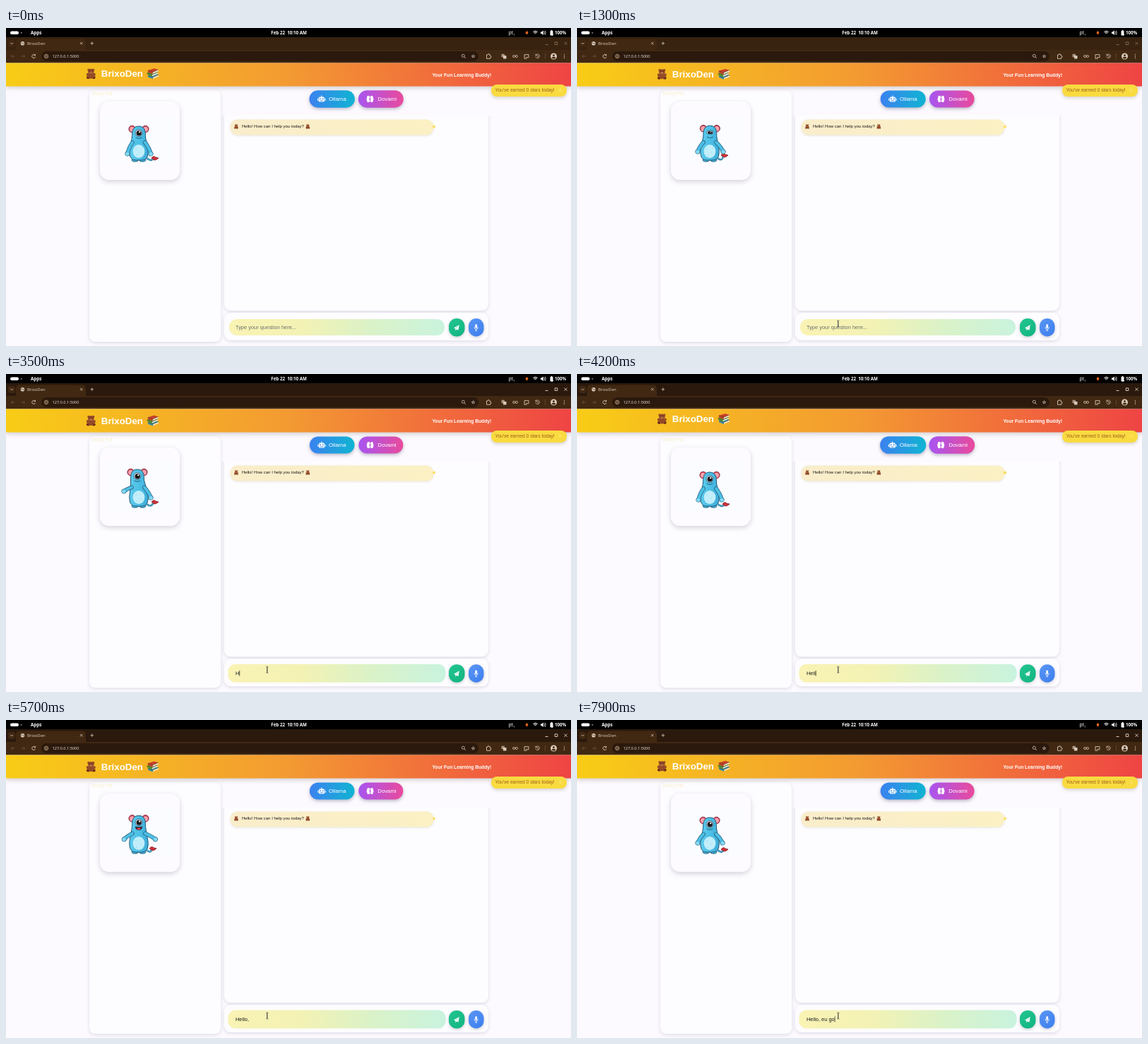
These frames come from a looping animation (800 by 450 pixels, 8000 ms). An HTML page with a canvas:

```html
<!DOCTYPE html>
<html lang="en">
<head>
<meta charset="utf-8">
<title>BrixoDen</title>
<style>
html, body { margin: 0; width: 100%; height: 100%; overflow: hidden; background: #fcfaff; }
canvas { display: block; width: 800px; height: 450px; }
</style>
</head>
<body>
<canvas id="stage" width="800" height="450"></canvas>
<script>
const LOOP = 8000;
const SANS = '"Liberation Sans", Arial, sans-serif';
const UI = '"Noto Sans", "Open Sans", sans-serif';
const canvas = document.getElementById('stage');
const c = canvas.getContext('2d');
const ratio = window.devicePixelRatio || 1;
canvas.width = 800 * ratio;
canvas.height = 450 * ratio;

// ---------- helpers ----------
function text(s, x, y, font, color) {
  c.font = font;
  c.fillStyle = color;
  c.fillText(s, x, y);
}
function box(x, y, w, h, r, fill) {
  c.beginPath();
  c.roundRect(x, y, w, h, r);
  c.fillStyle = fill;
  c.fill();
}
function oval(x, y, rx, ry, fill, line, width = 1) {
  c.beginPath();
  c.ellipse(x, y, rx, ry, 0, 0, Math.PI * 2);
  if (fill) { c.fillStyle = fill; c.fill(); }
  if (line) { c.strokeStyle = line; c.lineWidth = width; c.stroke(); }
}
function draw(d, fill, line, width = 1) {
  const p = new Path2D(d);
  if (fill) { c.fillStyle = fill; c.fill(p); }
  if (line) { c.strokeStyle = line; c.lineWidth = width; c.stroke(p); }
}
function blend(x0, y0, x1, y1, ...colors) {
  const g = c.createLinearGradient(x0, y0, x1, y1);
  colors.forEach((k, i) => g.addColorStop(i / (colors.length - 1), k));
  return g;
}
function shadow(color, blur, dy, fn) {
  c.save();
  c.shadowColor = color;
  c.shadowBlur = blur * ratio;
  c.shadowOffsetY = dy * ratio;
  fn();
  c.restore();
}
function at(x, y, scale, fn) {
  c.save();
  c.translate(x, y);
  c.scale(scale, scale);
  fn();
  c.restore();
}
function star(x, y, r, turn, fill) {
  c.beginPath();
  for (let i = 0; i < 10; i++) {
    const a = turn - Math.PI / 2 + i * Math.PI / 5;
    const k = i % 2 ? r * 0.45 : r;
    c.lineTo(x + k * Math.cos(a), y + k * Math.sin(a));
  }
  c.closePath();
  c.fillStyle = fill;
  c.fill();
}

// ---------- desktop and browser ----------
function topBar() {
  c.fillStyle = '#000';
  c.fillRect(0, 0, 800, 13);
  box(6, 4.5, 12, 4.5, 2.2, '#fff');
  oval(21.8, 6.8, 1.1, 1.1, '#777');
  text('Apps', 35, 9, '600 6.3px ' + UI, '#fff');
  text('Feb 22  10:10 AM', 375.3, 9, '600 6.2px ' + UI, '#fff');
  text('pt', 711.5, 9, '6.6px ' + UI, '#fff');
  text('1', 718, 10.5, '4px ' + UI, '#fff');
  oval(737.5, 6.8, 1.8, 2.3, '#d8601a');
  for (const r of [1.4, 3, 4.6]) {
    c.beginPath();
    c.arc(749.5, 9, r, -2.3, -0.85);
    c.strokeStyle = '#fff';
    c.lineWidth = 1;
    c.stroke();
  }
  draw('M757 5.5h1.6l2.2-2v6.6l-2.2-2h-1.6z', '#fff');
  draw('M762 4.8q1.6 2 0 4M763.2 3.6q2.2 3.2 0 6.4', null, '#fff', 0.7);
  box(770.5, 4, 4, 6.5, 0.8, '#fff');
  box(771.6, 3, 1.8, 1.5, 0.3, '#fff');
  draw('M773.5 7v4m-1.4-1.5h3', null, '#fff', 0.8);
  text('100%', 777, 9, '600 6.2px ' + UI, '#fff');
}

function browser(active) {
  const ink = '#d8c9ba', bar = '#412812', dim = '#75583f';
  c.fillStyle = active ? '#2a190c' : '#382210';
  c.fillRect(0, 13, 800, 18);
  box(14, 15.5, 99, 20, 5, bar);
  c.fillStyle = bar;
  c.fillRect(0, 31, 800, 18.5);
  box(3, 17, 10, 10, 3, bar);
  draw('M6.3 21l1.8 1.8 1.8-1.8', null, ink, 0.9);
  oval(23.5, 21.8, 2.8, 2.8, ink);
  draw('M21.3 21.6q1.3-1.5 2.2 0t2.4 0', null, bar, 0.8);
  text('BrixoDen', 30, 24, '5.9px ' + UI, ink);
  draw('M105 20l3.4 3.4m0-3.4l-3.4 3.4M119.5 21.7h4.6m-2.3-2.3v4.6', null, ink, 0.8);
  draw('M763.5 23.5h4M790.5 19.7l4 4m0-4l-4 4M777.2 19.9h3.6v3.6h-3.6z', null, active ? '#e5d9cf' : '#8a6c50', 0.9);

  draw('M12.5 40h-5m2-2.2l-2.2 2.2 2.2 2.2M21.5 40h5m-2-2.2l2.2 2.2-2.2 2.2', null, dim, 0.8);
  draw('M41.2 38.4a2.5 2.5 0 1 0 .4 2.5m-.1-4v2h-2', null, ink, 0.9);
  box(50, 33, 619, 14, 7, '#2a190c');
  oval(57, 40, 4, 4, bar);
  oval(57, 40, 2.4, 2.4, null, ink, 0.7);
  draw('M57 39.6v1.6m0-2.8v.6', null, ink, 0.7);
  text('127.0.0.1:5000', 65.5, 42, '5.6px ' + UI, '#e8ddd2');
  oval(647.3, 39.3, 2, 2, null, ink, 0.8);
  draw('M648.8 40.8l2 2', null, ink, 0.9);
  star(661.5, 40, 3, 0, ink);
  star(661.5, 40, 1.5, 0, '#2a190c');
  draw('M680.5 38h1.8q0-1.5 1-1.5t1 1.5h1.4v1.7q1.4 0 1.4 1t-1.4 1v1.6h-5.2z', null, ink, 0.9);
  box(701.5, 36.8, 4.5, 4.5, 0.6, '#a89480');
  box(704, 39, 4.5, 4.5, 0.6, ink);
  oval(719.2, 40, 1.7, 1.5, null, ink, 0.8);
  oval(722.8, 40, 1.7, 1.5, null, ink, 0.8);
  draw('M734 42.7v-5h6v4h-4m-2.5 1.5h4', null, ink, 0.9);
  draw('M750.2 38.2a2.8 2.8 0 1 1-.4 2.4m.1-3.8v2h2m.9-.2v1.8l1.2.8', null, ink, 0.8);
  draw('M763.5 36v8', null, dim, 0.6);
  oval(775.5, 40, 4.5, 4.5, ink);
  oval(775.5, 38.7, 1.4, 1.4, bar);
  oval(775.5, 42.2, 2.6, 1.4, bar);
  for (const y of [37.6, 40, 42.4]) oval(790.5, y, 0.7, 0.7, ink);
}

// ---------- page ----------
function bear(x, y, s) {
  at(x, y, s, () => {
    const fur = '#954a28', dark = '#6c3018';
    for (const k of [-1, 1]) {
      oval(k * 3.7, -5.8, 1.7, 1.7, fur);
      oval(k * 5, 1.5, 2, 2.3, fur);
      oval(k * 4.3, 6, 2.6, 2.2, dark);
    }
    oval(0, 3, 4.6, 4.8, fur);
    oval(0, -3.3, 4.6, 4, fur);
    oval(0, -1.8, 2, 1.5, '#c98758');
    for (const k of [-1, 1]) oval(k * 1.8, -4, 0.6, 0.6, '#200');
    oval(0, -2.4, 0.8, 0.5, '#200');
  });
}
function books(x, y) {
  at(x, y, 1, () => {
    const colors = ['#2b8aa8', '#5a9632', '#c8402c'];
    colors.forEach((k, i) => {
      const b = 2.2 - i * 3.5, dx = [0.6, -0.8, 0.2][i];
      draw(`M${dx - 7} ${b}l9-2.6 6 1.8-8 3.4z`, k);
      draw(`M${dx - 7} ${b}l7 2.6v2.6l-7-2.6z`, k);
      draw(`M${dx} ${b + 2.6}l8-3.4v2.2l-8 3.4z`, '#f5ecd5');
      draw(`M${dx - 7} ${b}l7 2.6 8-3.4`, null, '#43200c', 0.5);
    });
  });
}
function header(lift) {
  shadow('rgba(90,70,60,.25)', 6, 2, () => {
    c.fillStyle = blend(0, 49, 800, 82, '#f8cd16', '#f39a32', '#ef4444');
    c.fillRect(0, 49.5, 800, 33);
  });
  bear(120.3, 64.8 + lift, 0.93);
  text('BrixoDen', 134.8, 69.6 + lift, 'bold 13.3px ' + SANS, '#fff');
  books(207.6, 65 + lift);
  text('Your Fun Learning Buddy!', 603.4, 68.6, 'bold 6.7px ' + SANS, '#fff');
}
function badge() {
  shadow('rgba(90,80,60,.25)', 5, 2, () =>
    box(687, 80, 107, 17, 8, '#f9da40'));
  text("You've earned 0 stars today!", 692.4, 90.4, '6.7px ' + SANS, '#a0601c');
  star(785, 88, 3.4, 0, '#fce25c');
}
function panels() {
  const soft = 'rgba(70,60,100,.17)', paper = '#fdfcff';
  shadow(soft, 5, 1.5, () => box(118, 88, 186, 356, 8, paper));
  text('Study Pal', 121, 95, 'bold 6.5px ' + SANS, '#fbf3d8');
  shadow('rgba(70,60,90,.22)', 7, 2.5, () => box(133, 104, 113, 111, 13, '#fdfbff'));
  box(142, 123, 96, 71, 2, '#fbfcff');
  // the message list has a scrolled-off top edge
  c.save();
  c.beginPath();
  c.rect(304, 124, 390, 290);
  c.clip();
  shadow(soft, 5, 1.5, () => box(309, 110, 374, 290, 9, paper));
  c.restore();
  shadow(soft, 5, 1.5, () => box(309, 403, 374, 39, 9, paper));
}
function modelButton(x, y, w, scale, colors, label, icon) {
  at(x, y, scale, () => {
    shadow('rgba(60,50,90,.35)', 5, 2, () =>
      box(-w / 2, -12, w, 24, 12, blend(-w / 2, 0, w / 2, 0, ...colors)));
    icon();
    text(label, -w / 2 + 27, 2.7, '7.75px ' + SANS, '#fff');
  });
}
function robot() {
  box(-18.7, -3, 8, 7, 1.5, '#fff');
  box(-20.4, -1, 1.1, 3.5, 0.4, '#fff');
  box(-10.1, -1, 1.1, 3.5, 0.4, '#fff');
  c.fillRect(-15.2, -5, 1, 2.5);
  for (const x of [-16.6, -12.8]) oval(x, -0.3, 0.9, 0.9, '#3488e8');
  draw('M-17 2.4h4.6', null, '#3488e8', 0.9);
}
function brain() {
  for (const k of [-1, 1]) {
    const m = -15.2 + k * 2.3;
    oval(m, -2.2, 2, 2.4, '#fff');
    oval(m + k * 0.7, 0.4, 2, 2.1, '#fff');
    oval(m, 2.4, 2, 2.2, '#fff');
  }
}
function bubble(t) {
  shadow('rgba(90,80,60,.14)', 3, 1, () =>
    box(317.5, 129.5, 288, 22, 10, blend(317, 0, 606, 0, '#f9edcb', '#fbf1c4')));
  bear(326, 139.3, 0.4);
  text('Hello! How can I help you today?', 334, 141.4, '6.02px ' + SANS, '#1a1718');
  bear(427.3, 139.3, 0.4);
  const swing = Math.cos((t - 600) * Math.PI / 1000);
  star(606, 139.5, 3 + 0.4 * swing, swing * 0.35, '#fbd94e');
}

// time of each typed letter
const TYPED = 'Hello, eu go';
const KEYS = [3400, 3750, 3950, 4100, 4300, 4550, 4750, 6000, 6300, 6900, 7350, 7700];
function entry(t, active) {
  const grow = active ? 1.6 : 0;
  box(316 - grow, 412 - grow, 305 + 2 * grow, 23 + 2 * grow, 11,
    blend(316, 0, 621, 0, '#f9f3b4', '#f3f2b4', '#daf2c8', '#c9f3de'));
  const count = KEYS.filter(k => k <= t).length;
  const shown = TYPED.slice(0, count);
  text(shown || 'Type your question here...', 325, 426.2, '7.45px ' + SANS, count ? '#1a1a1c' : '#6c6f6c');
  const since = t - (count ? KEYS[count - 1] : 1900);
  if (active && since % 1000 < 500) {
    const x = 325.4 + (count ? c.measureText(shown).width : 0);
    draw(`M${x} 419.5v8`, null, '#222', 0.7);
  }
  shadow('rgba(60,60,80,.25)', 4, 1.5, () => {
    box(627, 411, 22.5, 25.5, 11, blend(627, 411, 649, 436, '#22c58e', '#12b482'));
    box(655, 411, 21.5, 25.5, 10.7, blend(655, 411, 676, 436, '#5a96f4', '#3c7eee'));
  });
  draw('M634 424.5l7.7-4.6-1.2 7.6-2.6-1.1-1.5 1.8-.2-2.6z', '#fff');
  draw('M636.4 425.6l4-4', null, '#1abc88', 0.5);
  box(664.3, 419.2, 2.8, 5.6, 1.4, '#fff');
  draw('M663 423.2q0 3 2.7 3t2.7-3m-2.7 3v2m-1.5 0h3', null, '#fff', 0.8);
}

// ---------- mascot ----------
// time, head x/y, left hand x/y, right hand x/y, mouth, eye, tail x/y
const CYCLE = 4000;
const POSES = [
  [0, 0, 0, 172, 178, 205, 178, 0, 1, 210, 184],
  [900, 0, 0, 172, 178, 205, 178, 0, 1, 210, 184],
  [1300, 0.3, -0.8, 171, 175, 207, 175, 0, 0.5, 208, 180],
  [1800, 0, -4, 167, 168, 212, 168, 1, 1, 207, 182],
  [2400, 3, -3.6, 170, 172, 212, 169, 1, 1, 209, 178],
  [2500, -0.3, -4, 167, 168, 212, 168, 1, 1, 206, 182],
  [3500, -2, -4, 167, 166, 205, 175, 0, 1, 210, 181],
  [3900, 0, -1, 171, 174, 206, 174, 0, 1, 208, 183],
  [CYCLE, 0, 0, 172, 178, 205, 178, 0, 1, 210, 184]
];
function poseAt(t) {
  const p = t % CYCLE;
  const i = POSES.findIndex(k => k[0] > p);
  const a = POSES[i - 1], b = POSES[i];
  const u = (p - a[0]) / (b[0] - a[0]);
  const e = u * u * (3 - 2 * u);
  return a.map((v, j) => v + (b[j] - v) * e);
}
const OUTLINE = '#235a78';
function arm(x0, y0, x1, y1, side) {
  const mx = (x0 + x1) / 2 + side * 2, my = (y0 + y1) / 2;
  const d = `M${x0} ${y0}Q${mx} ${my} ${x1} ${y1}`;
  c.lineCap = 'round';
  draw(d, null, OUTLINE, 5.6);
  oval(x1, y1, 3.3, 3.2, '#86d9f2', OUTLINE, 0.8);
  draw(d, null, '#4dbfe4', 4.2);
  oval(x1 + side * 0.3, y1 + 0.4, 2.5, 2.4, '#86d9f2');
  c.lineCap = 'butt';
}
function mascot(t) {
  const [, hx, hy, lx, ly, rx, ry, mouth, eye, tx, ty] = poseAt(t);
  const x = 188 + hx, y = 139 + hy;
  const tail = `M199 184Q206 190 ${tx - 1} ${ty}`;
  draw(tail, null, OUTLINE, 2.4);
  draw(tail, null, '#4dbfe4', 1.2);
  draw(`M${tx - 4} ${ty}q3-4 6-1l4 1q-3 3-6 3z`, '#d43038', '#7c1a24', 0.8);
  for (const k of [-1, 1]) {
    oval(x + k * 9.4, y + 4, 4.7, 4.8, '#d8405a', '#7a2c40', 0.9);
    oval(x + k * 9.6, y + 4.3, 3.3, 3.5, '#f4a3ac');
    oval(188 + k * 5.3, 186.8, 4.6, 2.3, '#45b4dc', OUTLINE, 0.9);
  }
  draw(`M${x} ${y}C${x + 9} ${y} ${x + 9.5} ${y + 8} ${x + 9.5} ${y + 15}`
    + ` C199 164 202 170 201 178 C200 187 195 187 188 187`
    + ` C181 187 176 187 175 178 C174 170 177 164 ${x - 9.5} ${y + 15}`
    + ` C${x - 9.5} ${y + 8} ${x - 9} ${y} ${x} ${y}Z`,
    blend(174, 0, 203, 0, '#5ecbec', '#4dc0e6', '#3ba8d6'), OUTLINE, 1);
  oval(188, 174.5, 8.4, 9.6, '#c2eefa');
  draw('M183 171h2m4 5h2m-7 4h2m5-11h1.5', null, '#98d9ee', 0.8);
  arm(179 + hx * 0.5, 162 + hy * 0.4, lx, ly, -1);
  arm(197 + hx * 0.5, 162 + hy * 0.4, rx, ry, 1);
  const ey = y + 9.5;
  oval(x, ey, 5, 5 * eye, '#f8fdff', OUTLINE, 0.9);
  oval(x + 0.2, ey + 0.2, 3.7, 3.8 * eye, '#17171f');
  oval(x + 1.2, ey - 1.4 * eye, 1.2, 1.2 * eye, '#fff');
  if (mouth > 0.2) {
    const h = 5.5 * mouth;
    draw(`M${x - 5} ${y + 15.5}q5 1.5 10 0q-.5 ${h}-5 ${h}t-5-${h}z`, '#5e1119', OUTLINE, 0.7);
    oval(x, y + 15 + h * 0.75, 2.5, h * 0.24, '#e64858');
  } else {
    draw(`M${x - 4.5} ${y + 16}q4.5 3 9 0`, null, OUTLINE, 0.9);
  }
}

function pointer() {
  draw('M368.3 414q1.5 0 1.5 1v7q0 1-1.5 1m3 0q-1.5 0-1.5-1v-7q0-1 1.5-1', null, '#33333a', 0.7);
}

// ---------- playback ----------
function render(t) {
  c.setTransform(ratio, 0, 0, ratio, 0, 0);
  c.fillStyle = '#fcfaff';
  c.fillRect(0, 0, 800, 450);
  const active = t >= 1900;
  const wave = Math.cos((t - 1600) * Math.PI / 1000);
  topBar();
  browser(active);
  panels();
  header(2 * wave - 0.9);
  badge();
  const pulse = 1.02 - 0.02 * wave;
  modelButton(461.7, 100.5, 63.5, pulse, ['#3b82f0', '#0fb4d2'], 'Ollama', robot);
  modelButton(530.8, 100.5, 63, pulse, ['#a855f0', '#e94a9c'], 'Dovami', brain);
  bubble(t);
  entry(t, active);
  mascot(t);
  if (t >= 1000) pointer();
}
function frame() {
  render(performance.now() % LOOP);
  requestAnimationFrame(frame);
}
frame();
</script>
</body>
</html>
```
